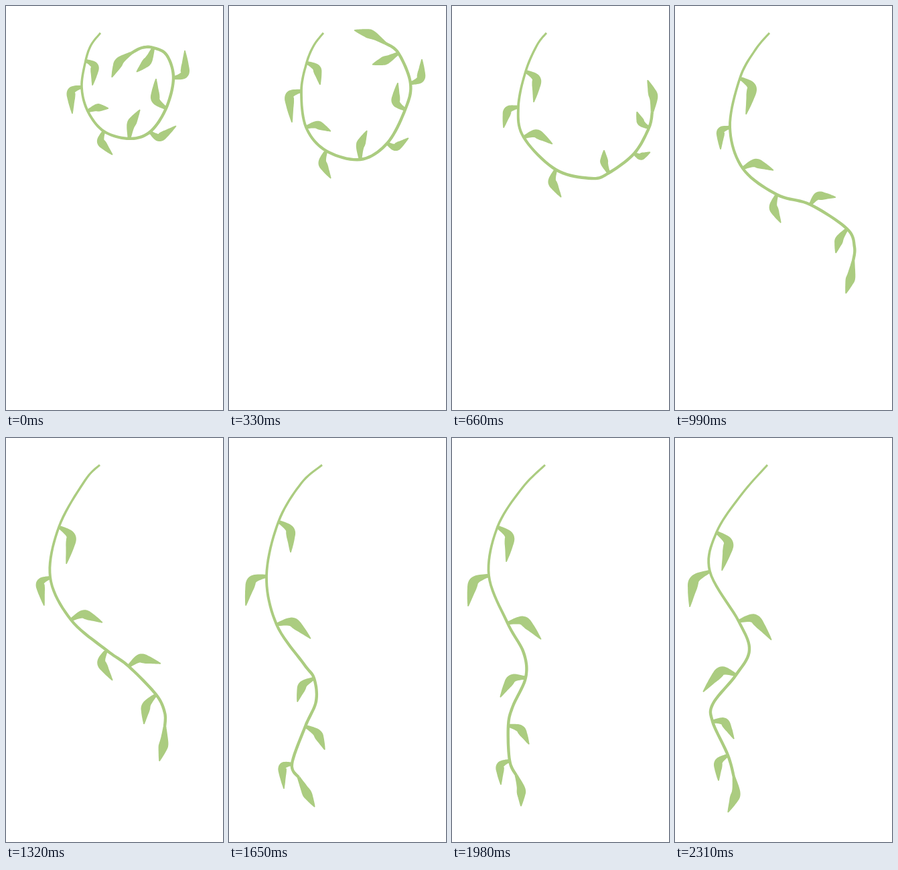
These frames come from a looping animation (324 px wide and 600 px high, 2640 ms). An HTML page:

```html
<!DOCTYPE html>
<html lang="en">
<head>
<meta charset="utf-8">
<title>Swinging vine</title>
<style>
  html, body { margin: 0; width: 100%; height: 100%; overflow: hidden; background: #fff; }
  svg { display: block; width: 100%; height: 100%; }
</style>
</head>
<body>
<svg viewBox="0 0 324 600"><path id="vine" fill="#abcc80"/></svg>
<script>
const HOLD = 330;

const add = (p, q, k = 1) => [p[0] + q[0] * k, p[1] + q[1] * k];
const sub = (p, q) => add(p, q, -1);
const dot = (p, q) => p[0] * q[0] + p[1] * q[1];
const unit = p => add([0, 0], p, 1 / (Math.hypot(...p) || 1));
const normal = ([x, y]) => [-y, x];

// Catmull-Rom curve through the points.
function smooth(points, steps = 10) {
  const last = points.length - 1;
  const at = i => points[Math.max(0, Math.min(last, i))];
  const curve = (a, b, c, d, t) => {
    const square = 2 * a - 5 * b + 4 * c - d;
    const cube = 3 * (b - c) + d - a;
    return b + 0.5 * t * (c - a + t * (square + t * cube));
  };
  const out = [];
  for (let i = 0; i < last * steps; i++) {
    const k = Math.floor(i / steps), t = i / steps - k;
    const [a, b, c, d] = [at(k - 1), at(k), at(k + 1), at(k + 2)];
    out.push([curve(a[0], b[0], c[0], d[0], t), curve(a[1], b[1], c[1], d[1], t)]);
  }
  return [...out, points[last]];
}

// Outline of a curve whose thickness varies along its length.
function ribbon(points, widthAt) {
  const line = smooth(points), last = line.length - 1;
  const left = [], right = [];
  line.forEach((p, i) => {
    const along = sub(line[Math.min(last, i + 1)], line[Math.max(0, i - 1)]);
    const side = normal(unit(along)), half = widthAt(i / last) / 2;
    left.push(add(p, side, half));
    right.unshift(add(p, side, -half));
  });
  return 'M' + [...left, ...right].map(p => p.map(v => v.toFixed(1)).join()).join('L') + 'Z';
}

// A leaf sets off in one direction and hooks round to its tip.
function leaf(base, tip, direction) {
  const chord = sub(tip, base), length = Math.hypot(...chord);
  const bend = (along, out) => add(add(base, chord, along), direction, out * length);
  const width = 7 + 0.13 * length;
  return ribbon([base, bend(0.12, 0.3), bend(0.45, 0.22), tip], t =>
    width * Math.abs(Math.sin(Math.PI * t)) ** 1.25 + 5 * (1 - t) ** 4 + 1.5 * t ** 3);
}

// Each node is "x,y" on the stem, followed by ">x,y" where a leaf tip belongs to it.
function vinePath(text) {
  const nodes = text.split(' ').map(node => node.split('>').map(p => p.split(',').map(Number)));
  const stem = nodes.map(([point]) => point), last = stem.length - 1;
  let path = ribbon(stem, t => 3 + 1.4 * Math.min(1, t * 2));
  nodes.forEach(([base, tip], i) => {
    if (!tip) return;
    const along = unit(sub(stem[Math.min(last, i + 1)], stem[i - 1]));
    const side = normal(along);
    const outward = dot(side, sub(tip, base)) > 0 ? side : sub([0, 0], side);
    path += leaf(base, tip, i === last ? along : outward);
  });
  return path;
}

const poses = [
  '141,40 127,58 119,81>129,118 113,120>99,160 122,156>153,152 146,186>159,221 184,197>200,154 215,187>254,178 239,152>224,108 250,107>267,66 240,73 220,62>195,98 203,62 187,70>158,106',
  '141,40 127,58 116,84>136,117 108,126>94,173 115,180>152,186 145,215>152,256 196,228>206,185 236,204>268,196 263,154>252,114 271,115>288,79 253,70>214,87 233,55>187,36',
  '141,40 127,58 110,97>122,143 99,150>77,181 107,195>150,205 155,243>163,284 208,256 234,248>227,214 272,219>296,217 294,181>276,157 299,157>292,110',
  '141,40 120,65 97,107>106,161 82,180>68,213 101,241>147,244 152,280>158,322 202,295>240,284 257,331>240,367 268,358 266,379>255,427',
  '140,40 118,63 79,132>90,187 66,207>57,249 97,270>144,274 150,315>159,360 183,339>231,335 224,381>206,425 237,408 237,429>229,480',
  '139,40 108,67 74,124>92,170 56,205>25,249 71,277>122,298 112,336 127,357>102,392 130,391 114,428>143,463 94,484>82,521 104,504>128,548',
  '139,40 105,74 68,132>81,184 55,204>24,250 83,275>133,299 107,319 110,356>72,385 91,398 84,427>115,455 86,479>73,515 96,501>103,547',
  '138,40 100,83 62,140>70,197 52,198>22,251 95,272>144,300 111,315 91,352>42,377 57,394 56,421>88,447 79,471>65,509 88,504>79,556'
].map(vinePath);

const vine = document.getElementById('vine');
const start = performance.now();

function draw(now) {
  const step = Math.floor(Math.max(0, now - start) / HOLD) % poses.length;
  vine.setAttribute('d', poses[step]);
  requestAnimationFrame(draw);
}
draw(start);
</script>
</body>
</html>
```
